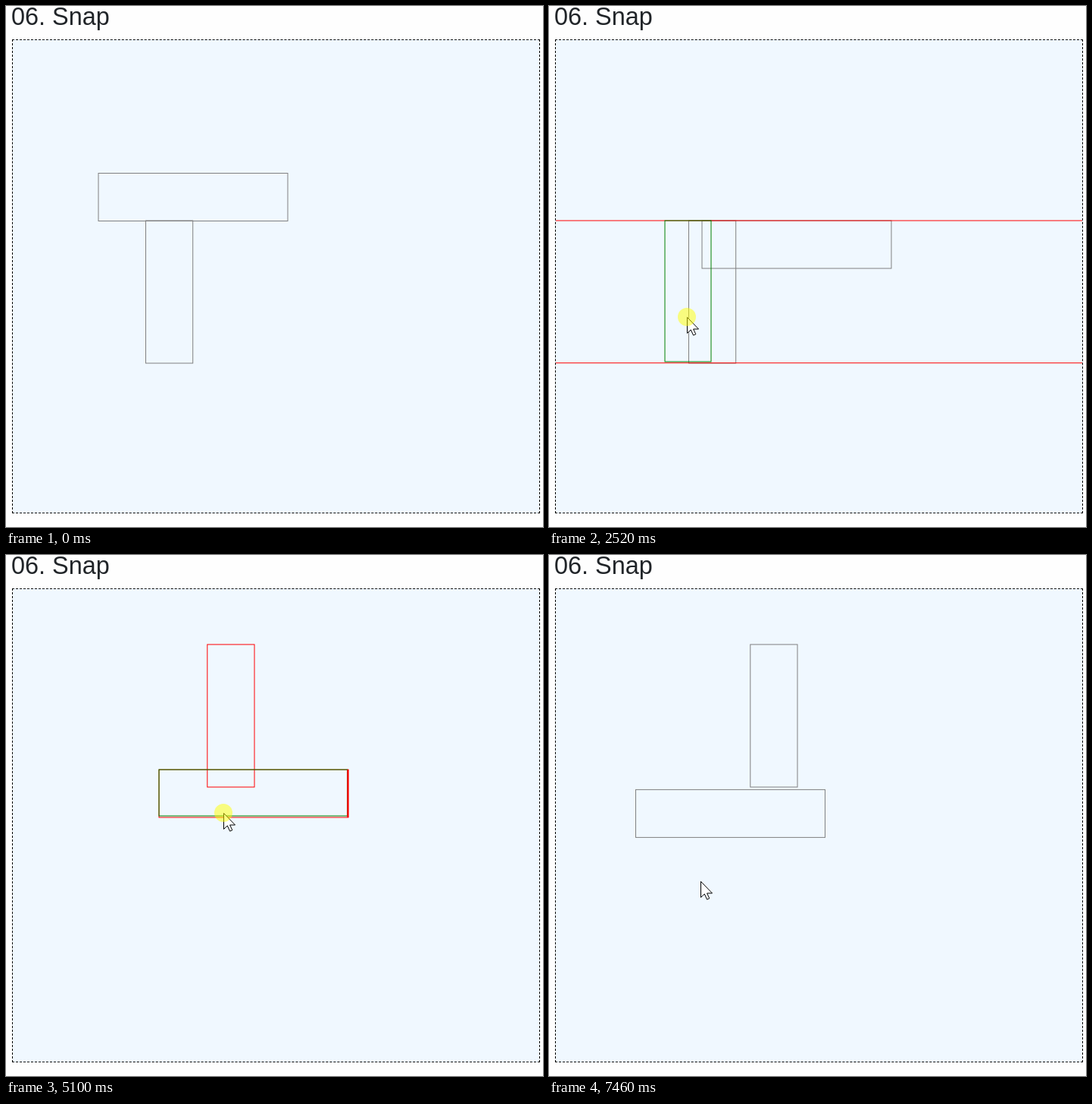
These frames come from a looping animation (709x687 px, 8 s). An HTML page:

```html
<!DOCTYPE html>
<html lang="en">
<head>
<meta charset="utf-8">
<title>Snap</title>
<style>
  html, body { margin: 0; width: 100%; height: 100%; overflow: hidden; background: #fefefe; }
  #board { position: absolute; left: 8px; top: 44px; width: 695px; height: 623px;
    border: 1px dashed #000; background: #f0f8ff; }
  svg { position: absolute; left: 0; top: 0; }
  text { font: 32.4px "Liberation Sans", Arial, sans-serif; fill: #212529; }
</style>
</head>
<body>
<div id="board"></div>
<svg width="709" height="687" viewBox="0 0 709 687">
  <text x="7" y="25">06. Snap</text>
  <g id="scene" fill="none"></g>
  <g id="cursor">
    <path d="M.5 .5V21.5L5.3 17L8.6 24.2L11.8 22.8L8.6 16H15.5Z" fill="#fff" stroke="#000"/>
    <circle id="halo" r="12" fill="#ff0" opacity=".5"/>
  </g>
</svg>
<script>
const LOOP = 8000;
const SIZE = { bar: [250, 63], post: [62.2, 188] };
const RED = '#f00', GREEN = '#008000', GRAY = '#808080', DARK = '#505050';
const byId = id => document.getElementById(id);

let state = { bar: [122, 220.5], post: [184.5, 283], cursor: null, held: null,
  hot: false, h: [], v: [], dark: [] };
const timeline = [{ time: 0, state }];

// Spreads state changes evenly from start to end.
function run(start, end, ...changes) {
  const gap = changes.length > 1 ? (end - start) / (changes.length - 1) : 0;
  changes.forEach((change, i) => {
    state = { ...state, ...change };
    timeline.push({ time: start + i * gap - (i ? 12 : 0), state });
  });
}

// Cursor positions along a quadratic curve, without its first point.
function glide(n, from, to, via = [(from[0] + to[0]) / 2, (from[1] + to[1]) / 2]) {
  return Array.from({ length: n }, (_, i) => {
    const s = (i + 1) / n, r = 1 - s;
    return { cursor: [0, 1].map(k => r * r * from[k] + 2 * r * s * via[k] + s * s * to[k]) };
  });
}

// A drag keeps the cursor at a fixed offset from the held shape.
function dragger(name, origin, grip) {
  const at = (x, y) => [grip[0] + x - origin[0], grip[1] + y - origin[1]];
  const free = { hot: false, h: [], v: [], dark: [] };
  return {
    press: { ...free, held: { name, pos: origin }, hot: true, cursor: grip },
    to: (x, y, guides) => ({ ...free, held: { name, pos: [x, y] }, cursor: at(x, y), ...guides }),
    drop: (x, y, cursor = at(x, y)) => ({ ...free, held: null, [name]: [x, y], cursor })
  };
}

run(130, 890, ...glide(6, [520, 640], [58, 420], [200, 640]),
  ...glide(5, [58, 420], [257, 272], [90, 262]));

let d = dragger('bar', [122, 220.5], [257, 272]);
run(980, 1450, d.press,
  d.to(136, 220.5, { h: [220.5, 283] }),
  d.to(158, 230),
  d.to(184.5, 248, { v: [184.5] }),
  d.to(196, 268),
  d.to(202, 283, { h: [283] }),
  d.drop(202, 283));

d = dragger('post', [184.5, 283], [213, 410]);
run(1670, 2470, ...glide(5, [337, 335], [213, 410]), d.press,
  d.to(184.5, 279, { v: [184.5, 246.5] }),
  d.to(176, 277),
  d.to(166, 275),
  d.to(158, 274),
  d.to(153, 273));
run(2520, 2520, d.to(153, 283, { h: [283, 470.7] }));
run(2920, 3230,
  d.to(139.8, 246, { v: [202] }),
  d.to(128, 196),
  d.to(117, 148),
  d.to(110, 122),
  d.drop(109.5, 118, [136, 245]));

run(3380, 3550, ...glide(3, [136, 245], [301, 315]));

d = dragger('post', [109.5, 118], [153, 258]);
const level = { h: [118], dark: [305.5] };
run(3780, 4480, ...glide(4, [301, 315], [153, 258], [230, 335]), d.press,
  d.to(138, 118, level),
  d.to(190, 118, level),
  d.to(240, 118, level),
  d.to(266.5, 118, level),
  d.drop(265.8, 118, [310, 258]));

run(4700, 4890, ...glide(3, [310, 258], [287, 340]));

d = dragger('bar', [202, 283], [287, 340]);
run(5100, 5420, d.press,
  d.to(182, 306, { h: [306] }),
  d.to(148, 342),
  d.to(122, 366),
  d.drop(114.5, 373.2, [200, 430]));

run(5900, 5980, { held: { name: 'bar', pos: [114.5, 373.2] } }, { held: null });
run(6680, 6680, { bar: [114.5, 310.6] });
run(7460, 7460, { bar: [114.5, 309.4] });

const line = (x1, y1, x2, y2, color, width = 1) =>
  `<path d="M${x1} ${y1}L${x2} ${y2}" stroke="${color}" stroke-width="${width}"/>`;
const across = (y, color) => line(9, y, 704, y, color);
const box = ([x, y], [w, h], color) =>
  `<rect x="${x}" y="${y}" width="${w}" height="${h}" stroke="${color}"/>`;

function draw(s) {
  const color = s.hot ? RED : GRAY;
  let out = box(s.bar, SIZE.bar, color) + box(s.post, SIZE.post, color);
  out += s.h.map(y => across(y, RED)).join('');
  out += s.dark.map(y => across(y, DARK)).join('');
  out += s.v.map(x => line(x, 45, x, 668, RED)).join('');
  if (s.held) {
    const [x, y] = s.held.pos, [w, h] = SIZE[s.held.name];
    out += box([x, y], [w - 1.2, h - 2], GREEN);
    if (s.hot) out += line(x + w - .7, y, x + w - .7, y + h, RED, 2);
    if (s.dark.length) out += line(x + w - 1.2, y, x + w - 1.2, y + h - 2, '#2b4b2b');
  }
  byId('scene').innerHTML = out;
  byId('cursor').style.display = s.cursor ? '' : 'none';
  if (s.cursor) byId('cursor').setAttribute('transform', `translate(${s.cursor.map(Math.round)})`);
  byId('halo').style.display = s.held ? '' : 'none';
}

let shown;
const began = performance.now();
function tick() {
  const time = (performance.now() - began) % LOOP;
  const now = timeline.filter(entry => entry.time <= time).pop().state;
  if (now !== shown) draw(shown = now);
  requestAnimationFrame(tick);
}
tick();
</script>
</body>
</html>
```
